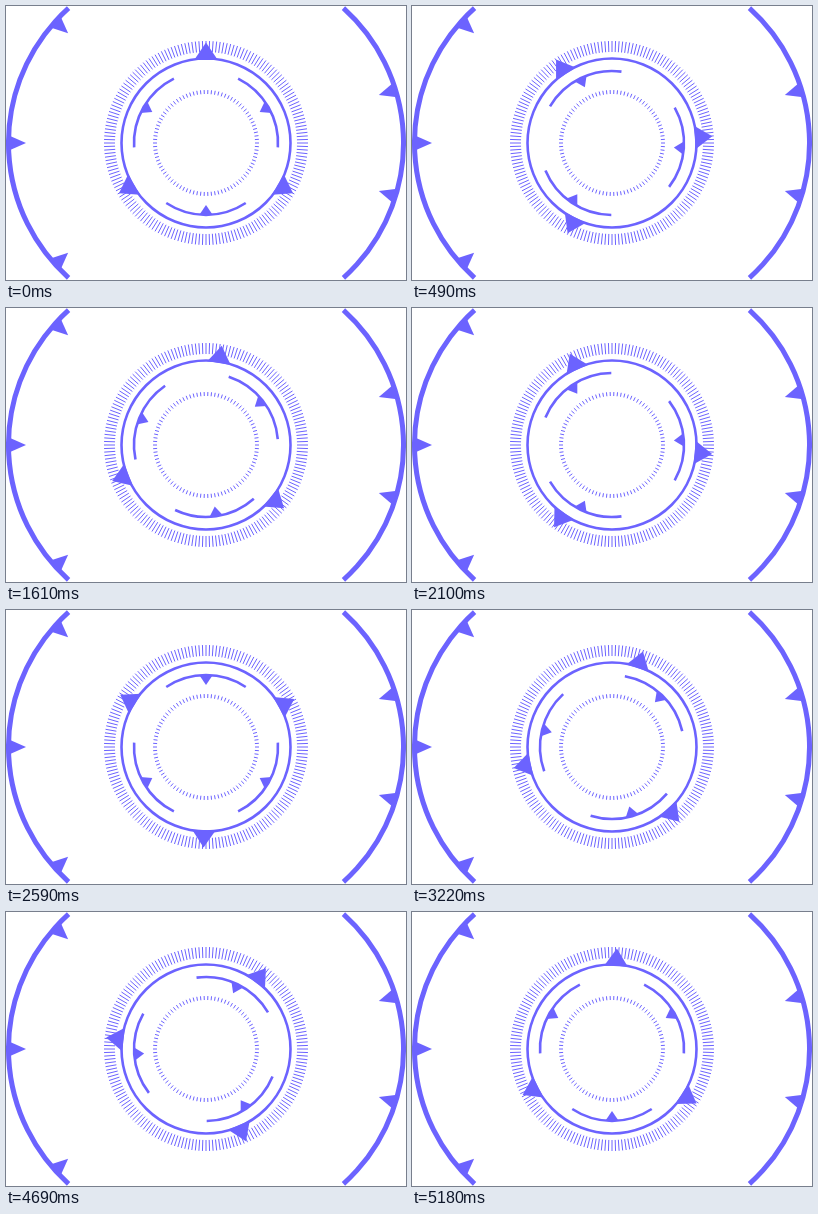
Animation, 400 px wide and 274 px high, one loop 5250 ms. Source, as an HTML page with a canvas:

```html
<!DOCTYPE html>
<html lang="en">
<head>
<meta charset="utf-8">
<title>Rotating dial</title>
<style>
  html, body { margin: 0; width: 100%; height: 100%; overflow: hidden; background: #fff; }
  canvas { display: block; width: 400px; height: 274px; }
</style>
</head>
<body>
<canvas id="stage" width="400" height="274"></canvas>
<script>
const ctx = document.getElementById('stage').getContext('2d');
const COLOR = '#6c63ff';
const CX = 200, CY = 137;
const STEP = 70, STEPS = 75;
const INNER_TURN = 360 / 74;
const OUTER_TURN = -357.2 / 74;
const rad = deg => deg * Math.PI / 180;

function arc(x, y, r, from, to, width) {
  ctx.lineWidth = width;
  ctx.beginPath();
  ctx.arc(x, y, r, rad(from), rad(to));
  ctx.stroke();
}

// Triangle standing on radius `base`, with its tip at radius `tip`.
function pointer(x, y, deg, base, tip, half) {
  ctx.save();
  ctx.translate(x, y);
  ctx.rotate(rad(deg));
  ctx.beginPath();
  ctx.moveTo(tip, 0);
  ctx.lineTo(base, -half);
  ctx.lineTo(base, half);
  ctx.fill();
  ctx.restore();
}

function ticks(count, r1, r2, width) {
  ctx.lineWidth = width;
  ctx.beginPath();
  for (let i = 0; i < count; i++) {
    const a = 2 * Math.PI * i / count, c = Math.cos(a), s = Math.sin(a);
    ctx.moveTo(CX + r1 * c, CY + r1 * s);
    ctx.lineTo(CX + r2 * c, CY + r2 * s);
  }
  ctx.stroke();
}

function sideArc(x, mid, marks) {
  arc(x, CY, 181.5, mid - 48, mid + 48, 5);
  for (const m of marks) pointer(x, CY, mid + m, 181, 164, 7.5);
}

function draw(step) {
  ctx.fillStyle = '#fff';
  ctx.fillRect(0, 0, 400, 274);
  ctx.fillStyle = ctx.strokeStyle = COLOR;

  sideArc(184, 180, [-42, 0, 42]);
  sideArc(216, 0, [-17, 17]);

  ticks(180, 91, 102, 1);
  ticks(90, 49, 53, 1);
  arc(CX, CY, 84.5, 0, 360, 2.6);

  for (let i = 0; i < 3; i++) {
    pointer(CX, CY, -90 + 120 * i + step * OUTER_TURN, 83, 100.5, 11.8);
    const mid = 90 + 120 * i + step * INNER_TURN;
    arc(CX, CY, 72, mid - 33.5, mid + 33.5, 2.6);
    pointer(CX, CY, mid, 72, 62, 6.8);
  }
}

function frame() {
  draw(Math.floor(performance.now() / STEP) % STEPS);
  requestAnimationFrame(frame);
}
frame();
</script>
</body>
</html>
```
